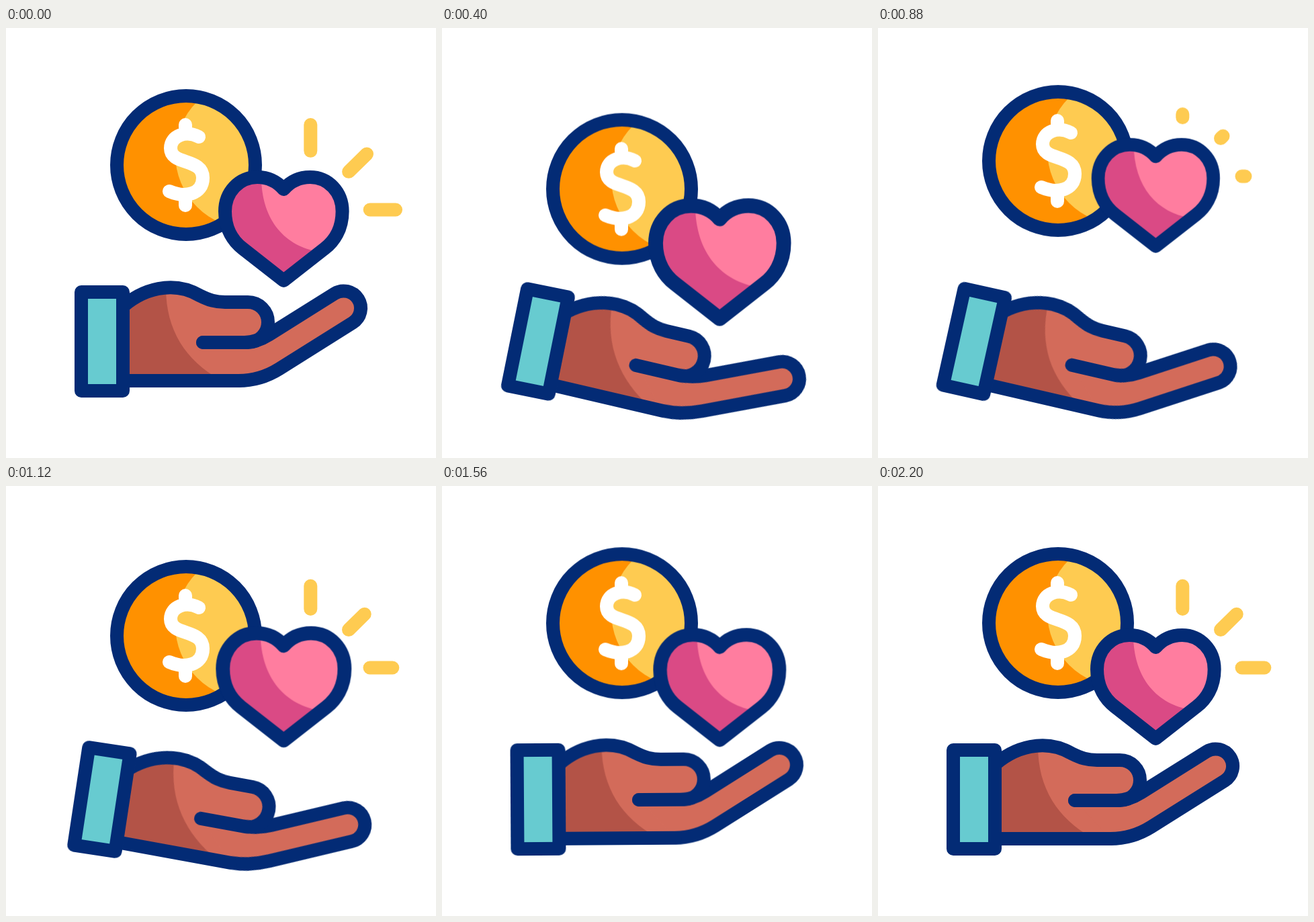
Recreate the animation shown at these times as an HTML page. Size 640 by 640 pixels, loop 2.24 s.

```html
<!DOCTYPE html>
<html lang="en">
<head>
<meta charset="utf-8">
<title>Giving hand</title>
<style>
html, body { margin: 0; width: 100%; height: 100%; overflow: hidden; background: #fff; }
svg { display: block; width: 640px; height: 640px; }

.line { fill: none; stroke: #032b75; stroke-width: 20; stroke-linecap: round; stroke-linejoin: round; }
.skin { fill: #d36b5a; }
.shade { fill: #b35347; }

.arm, .hand, .shade, .finger, .coin, .gift, .heart {
  animation: 2240ms cubic-bezier(.37, 0, .63, 1) infinite;
}
.arm, .hand { transform-origin: 143px 466px; }
.arm { animation-name: arm; }
.hand { animation-name: hand; }
.shade { animation-name: shade; transform-origin: 238px 390px; }
.finger { animation-name: finger; }
.coin { animation-name: coin; }
.gift { animation-name: gift; }
.heart { animation-name: beat; transform-origin: 413.3px 299px; }
.heart .line { vector-effect: non-scaling-stroke; }
.ray {
  fill: none; stroke: #fecb51; stroke-width: 20; stroke-linecap: round; stroke-dasharray: 1 2;
  animation: shoot 2240ms linear infinite, show 2240ms step-end infinite;
}

@keyframes arm {
  0%, 89.3%, 100% { transform: rotate(0deg); }
  13.2% { transform: rotate(17deg); }
  26.8% { transform: rotate(-4deg); }
  43.75% { transform: rotate(15.6deg); }
  58.9% { transform: rotate(-3.4deg); }
  76.8% { transform: rotate(1.2deg); }
}
/* The palm trails the wrist a little. */
@keyframes hand {
  0%, 25%, 59.8%, 100% { transform: rotate(0deg); }
  13.4% { transform: rotate(2.5deg); }
  17.86% { transform: rotate(1.7deg); }
  39.3% { transform: rotate(.5deg); }
  47% { transform: rotate(2deg); }
}
@keyframes shade {
  0%, 25%, 39.3%, 60.7%, 100% { transform: skewX(0deg); }
  17.86%, 49.1% { transform: skewX(3.7deg); }
}
@keyframes finger {
  0%, 73.2%, 100% { d: path("M293 468 H355 Q373.2 468 391.8 456.3 L488.9 395.4 A25.5 25.5 0 0 1 516.1 438.6 L406.4 507.5 Q378.4 525 346 525"); }
  17.86%, 49.1% { d: path("M293 468 H355 Q377.5 468 397.7 459.2 L499.5 414.7 A25.5 25.5 0 0 1 519.9 461.5 L404.7 511.8 Q374.5 525 346 525"); }
  25%, 26.8% { d: path("M293 468 H355 Q372.4 468 390.6 455.7 L481.6 394.1 A25.5 25.5 0 0 1 510.2 436.3 L406.5 506.5 Q379.2 525 346 525"); }
  39.3% { d: path("M293 468 H355 Q373.8 468 392.6 456.6 L486 400.3 A25.5 25.5 0 0 1 512.4 443.9 L406.2 508 Q377.9 525 346 525"); }
  60.7% { d: path("M293 468 H355 Q373.9 468 392.8 456.7 L490.5 397.9 A25.5 25.5 0 0 1 516.7 441.7 L406.4 508 Q378.1 525 346 525"); }
}
@keyframes coin {
  0%, 71.4%, 100% { transform: translateY(0); }
  13.84% { transform: translateY(51px); }
  30.8% { transform: translateY(-64.5px); }
  44.6% { transform: translateY(21px); }
}
@keyframes gift {
  0%, 71.4%, 100% { transform: translateY(0); }
  15.2% { transform: translateY(52px); }
  42.4% { transform: translateY(-53px); }
  55.4% { transform: translateY(30px); }
}
@keyframes beat {
  0%, 73.2%, 100% { transform: scale(1); }
  15.2%, 20.5%, 58%, 60.7% { transform: scale(1.092); }
  40.2%, 42% { transform: scale(.982); }
}
/* Each ray grows outwards from its inner end, then empties towards its outer end. */
@keyframes shoot {
  0%, 51.79%, 100% { stroke-dashoffset: 0; }
  9.2%, 60.98% { stroke-dashoffset: -1; }
  37.5%, 85.71% { stroke-dashoffset: 1; }
}
@keyframes show {
  0%, 37.6%, 85.8% { opacity: 1; }
  9.2%, 60.98% { opacity: 0; }
}
</style>
</head>
<body>
<svg viewBox="0 0 640 640">
  <defs>
    <path id="heartShape" d="M413.3 240 C403 228 389 222 374 222 C347 222 326 244 326 273 C326 300 339 318 352 328 L413.3 376 L474.6 328 C487.6 318 500.6 300 500.6 273 C500.6 244 479.6 222 452.6 222 C437.6 222 423.6 228 413.3 240 Z"/>
    <clipPath id="heartClip"><use href="#heartShape"/></clipPath>
    <clipPath id="coinClip"><circle cx="268" cy="204" r="103"/></clipPath>
  </defs>

  <g class="arm">
    <g class="hand">
      <path class="skin" d="M168 420 C203 386 250 376 288 398 C302 405 312 408 326 408 H360 A30 30 0 0 1 360 468 V520 H168 Z"/>
      <path class="shade" d="M168 420 C188 401 212 388 238 387 C238 450 268 495 318 523 H168 Z"/>
      <path class="line finger" style="fill:#d36b5a" d="M293 468 H355 Q373.2 468 391.8 456.3 L488.9 395.4 A25.5 25.5 0 0 1 516.1 438.6 L406.4 507.5 Q378.4 525 346 525"/>
      <path class="line" d="M168 420 C203 386 250 376 288 398 C302 405 312 408 326 408 H360 A30 30 0 0 1 360 468 H293 M347 525 H168"/>
    </g>
    <rect class="line" style="fill:#67cbd0" x="112" y="393" width="62" height="147"/>
  </g>

  <g class="coin">
    <circle cx="268" cy="204" r="103" fill="#ff9100"/>
    <circle cx="363" cy="188" r="111" fill="#fecb51" clip-path="url(#coinClip)"/>
    <circle class="line" cx="268" cy="204" r="103"/>
    <path class="line" style="stroke:#fff" d="M287 162 C268 152 245 160 245 179 C245 205 293 193 293 223 C293 248 266 253 243 243 M267 144 V156 M267 248 V264"/>
  </g>

  <g class="gift">
    <path class="ray" pathLength="1" d="M453.3 183 V144"/>
    <path class="ray" pathLength="1" d="M510 214 L537 187.5"/>
    <path class="ray" pathLength="1" d="M541.5 270.5 H580"/>
    <g class="heart">
      <use href="#heartShape" fill="#ff7d9f"/>
      <path fill="#da4a85" clip-path="url(#heartClip)" d="M380 215 C378 285 415 325 466 333 L420 390 H320 V215 Z"/>
      <use class="line" href="#heartShape"/>
    </g>
  </g>
</svg>
</body>
</html>
```
